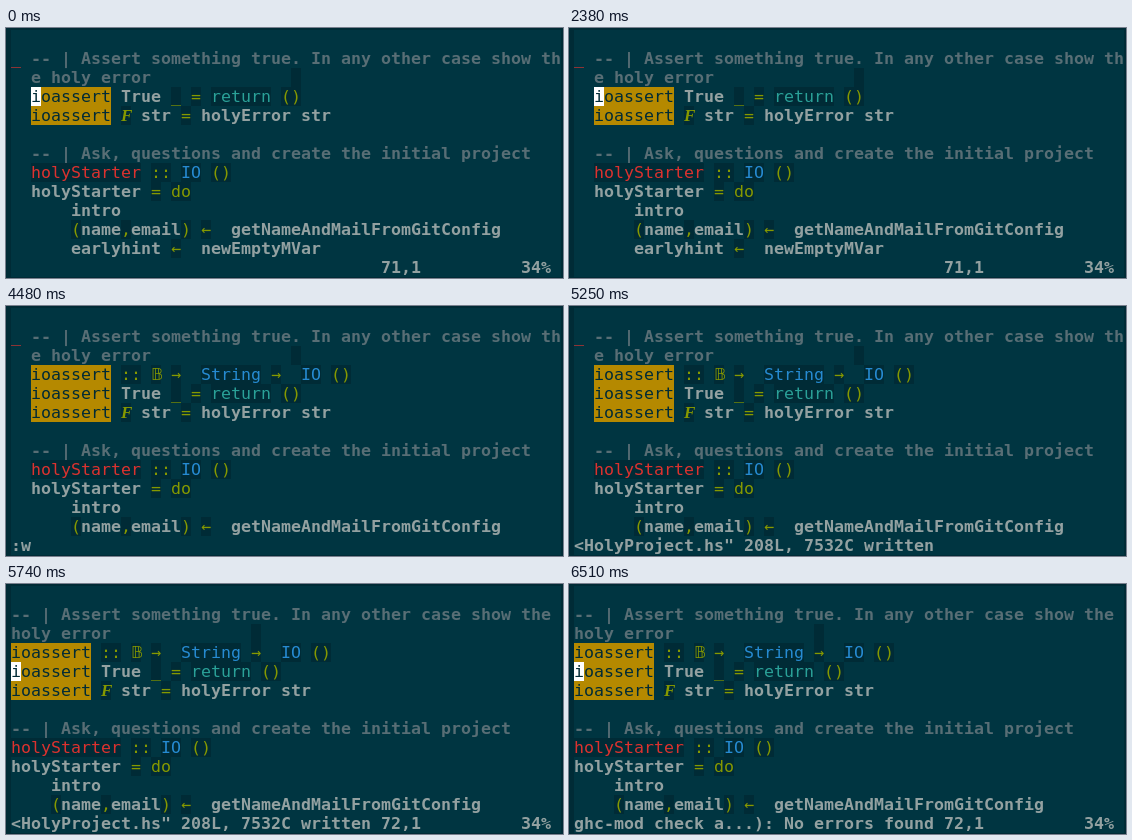
An HTML page that plays this animation: 557 px wide and 250 px high, repeating every 7140 ms.

```html
<!DOCTYPE html>
<html lang="en">
<head>
<meta charset="utf-8">
<title>Editor session</title>
<style>
html, body { margin: 0; width: 100%; height: 100%; overflow: hidden; background: #002b36; }
#screen {
  position: absolute; left: 0; top: 0; width: 557px; height: 250px; overflow: hidden;
  font: 16.61px/19px "DejaVu Sans Mono", "DejaVu Sans", monospace;
  font-variant-ligatures: none;
}
#pane { position: absolute; left: 5px; top: 2px; width: 550px; height: 247px; background: #003541; }
#screen span { position: absolute; height: 19px; white-space: pre; }
.n { color: #93a1a1; font-weight: bold; }
.c { color: #586e75; font-weight: bold; }
.y { color: #002b36; background: #b58900; }
.r { color: #dc322f; background: #002b36; }
.b { color: #268bd2; background: #002b36; }
.t { color: #2aa198; background: #002b36; }
.g { color: #859900; background: #002b36; }
.s { color: #dc322f; }
.d { background: #002b36; }
.k { color: #002b36; background: #fff; }
.f { color: #859900; background: #002b36; font: italic bold 17px/19px "Liberation Serif", serif; }
</style>
</head>
<body>
<div id="screen"><div id="pane"></div><div id="text"></div></div>
<script>
const CELL = 10, ROW = 19, LEFT = 5, TOP = 21, LOOP = 7140;
const text = document.getElementById("text");

const name = ["y", "ioassert"], gap = ["n", " "];
const unit = ["g", "()"], eq = ["g", "="], io = ["b", "IO"];
const arrow = ["g", "→"], bind = ["g", "←"];

const signature = [name, gap, ["g", "::"], gap, ["g", "𝔹"], gap, arrow, ["n", "  "],
  ["b", "String"], gap, arrow, ["n", "  "], io, gap, unit];
const code = [
  [name, ["n", " True "], ["g", "_"], gap, eq, gap, ["t", "return"], gap, unit],
  [name, gap, ["f", "F"], ["n", " str "], eq, ["n", " holyError str"]],
  [],
  [["c", "-- | Ask, questions and create the initial project"]],
  [["r", "holyStarter"], gap, ["g", "::"], gap, io, gap, unit],
  [["n", "holyStarter "], eq, gap, ["g", "do"]],
  [["n", "    intro"]],
  [["n", "    "], ["g", "("], ["n", "name"], ["g", ","], ["n", "email"], ["g", ")"], gap,
    bind, ["n", "  getNameAndMailFromGitConfig"]],
  [["n", "    earlyhint "], bind, ["n", "  newEmptyMVar"]]
];
const comment = "-- | Assert something true. In any other case show the holy error";
const written = '<HolyProject.hs" 208L, 7532C written';
const checked = "ghc-mod check a...): No errors found";

const scenes = [
  { at: 0, gutter: 2, cursor: 2, pos: "71,1" },
  { at: 3710, gutter: 2, typed: true, cursor: 3, pos: "72,1" },
  { at: 4340, gutter: 2, typed: true, status: ":" },
  { at: 4480, gutter: 2, typed: true, status: ":w" },
  { at: 5250, gutter: 2, typed: true, status: written },
  { at: 5320, gutter: 0, typed: true, cursor: 3, status: written, pos: "72,1" },
  { at: 6510, gutter: 0, typed: true, cursor: 3, status: checked, pos: "72,1" }
];

function put(row, col, kind, str) {
  const el = document.createElement("span");
  const cells = [...str].length;
  el.className = kind;
  el.textContent = str;
  el.style.left = LEFT + col * CELL + "px";
  el.style.top = TOP + row * ROW + "px";
  el.style.width = cells * CELL + "px";
  text.append(el);
  return col + cells;
}

function draw(scene) {
  text.textContent = "";
  const start = scene.gutter, width = 55 - start;
  if (start) put(0, 0, "s", "_");
  put(1, start + 79 - width, "d", " ");
  put(0, start, "c", comment.slice(0, width));
  put(1, start, "c", comment.slice(width));

  const lines = scene.typed ? [signature, ...code] : code;
  lines.slice(0, 9).forEach((line, i) => {
    let col = start;
    for (const [kind, str] of line) col = put(i + 2, col, kind, str);
  });

  if (scene.cursor) put(scene.cursor, start, "k", "i");
  if (scene.status) put(11, 0, "n", scene.status);
  if (scene.pos) {
    put(11, 37, "n", scene.pos);
    put(11, 51, "n", "34%");
  }
}

let shown;
const begin = performance.now();
function tick() {
  const t = Math.max(0, performance.now() - begin) % LOOP;
  const scene = scenes.findLast(s => s.at <= t);
  if (scene !== shown) draw(shown = scene);
  requestAnimationFrame(tick);
}
tick();
</script>
</body>
</html>
```
